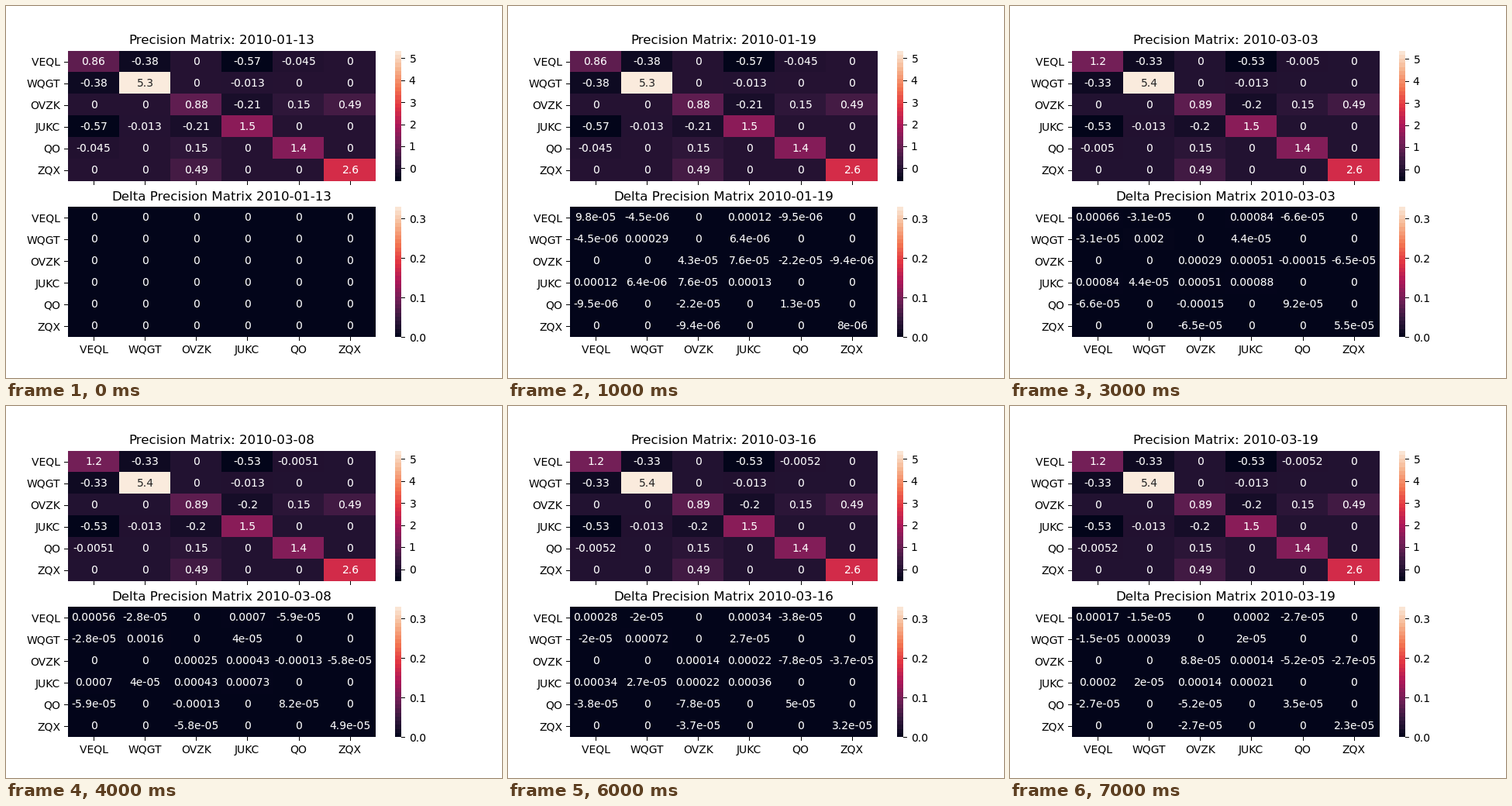
Write an HTML page with a canvas that moves like this. It is 640x480 px and loops after 8000 ms.

```html
<!DOCTYPE html>
<html lang="en">
<head>
<meta charset="utf-8">
<title>Precision matrix</title>
<style>
  html, body { margin: 0; width: 100%; height: 100%; overflow: hidden; background: #fff; }
  canvas { display: block; }
</style>
</head>
<body>
<canvas id="stage" width="640" height="480"></canvas>
<script>
const ctx = document.getElementById('stage').getContext('2d');
const STEP = 1000;
const LABELS = ['VEQL', 'WQGT', 'OVZK', 'JUKC', 'QO', 'ZQX'];
const DATES = ['01-13', '01-19', '02-26', '03-03', '03-08', '03-11', '03-16', '03-19'];
const N = LABELS.length;
const LEFT = 80, WIDTH = 396.8, HEIGHT = 168;
const CELL_W = WIDTH / N, CELL_H = HEIGHT / N;
const BAR = { x: 502, w: 8, bands: 32 };
const SMALL = 13.89, LARGE = 16.67;
const RAMP = ['#03051a', '#35193e', '#701f57', '#ad1759', '#e13342', '#f37651', '#f6b48f', '#faebdd'];

// Non-zero entries of the symmetric matrices; change is the peak delta in 1e-6.
const ENTRIES = [
  { at: '00', value: 0.857, change: 700, drift: 0.34 },
  { at: '01', value: -0.376, change: -32, drift: 0.043 },
  { at: '03', value: -0.57, change: 890, drift: 0.042 },
  { at: '04', value: -0.0451, change: -68, drift: 0.04016 },
  { at: '11', value: 5.347, change: 2100, drift: 0.025 },
  { at: '13', value: -0.013, change: 46 },
  { at: '22', value: 0.884, change: 310, drift: 0.003 },
  { at: '23', value: -0.206, change: 540, drift: 0.003 },
  { at: '24', value: 0.15, change: -160 },
  { at: '25', value: 0.49, change: -67 },
  { at: '33', value: 1.5, change: 930 },
  { at: '44', value: 1.4, change: 96 },
  { at: '55', value: 2.6, change: 57 }
];

// The estimate shifts at the third date, then slowly relaxes.
function precision({ value, drift = 0 }, step) {
  return step < 2 ? value : value + drift * (1 - 0.0015 * (step - 2));
}

// Changes start small, peak at the third date and shrink by a falling power.
function delta({ change }, step) {
  if (step < 2) return step * 0.14 * change * 1e-6;
  const power = 1 - 0.22 * ((step - 2) / 5) ** 2;
  return Math.sign(change) * Math.abs(change) ** power * 1e-6;
}

function matrix(rule, step) {
  const grid = LABELS.map(() => Array(N).fill(0));
  for (const entry of ENTRIES) {
    const [r, c] = entry.at;
    grid[r][c] = grid[c][r] = rule(entry, step);
  }
  return grid;
}

function shade(t) {
  const pos = Math.min(1, Math.max(0, t)) * (RAMP.length - 1);
  const i = Math.min(RAMP.length - 2, Math.floor(pos));
  const channel = (hex, k) => parseInt(hex.slice(k, k + 2), 16);
  const mix = k => {
    const a = channel(RAMP[i], k), b = channel(RAMP[i + 1], k);
    return Math.round(a + (b - a) * (pos - i));
  };
  return `rgb(${[1, 3, 5].map(mix)})`;
}

// Two significant digits, with an exponent below 1e-4.
function format(v) {
  if (v === 0) return '0';
  const rounded = +v.toPrecision(2);
  if (Math.abs(rounded) >= 1e-4) return String(rounded);
  return rounded.toExponential(1).replace('.0e', 'e').replace('e-', 'e-0');
}

function setFont(size) {
  ctx.font = `${size}px "DejaVu Sans", sans-serif`;
}

// Whole-pixel layout: the first glyph snaps down by its bearing, the rest snap up.
function text(str, x, y, align = 0.5, color = '#000', size = SMALL) {
  const first = str[0], rest = str.slice(1), zoom = 100;
  setFont(size * zoom);
  const bearing = -ctx.measureText(first).actualBoundingBoxLeft / zoom;
  const width = ctx.measureText(str).width / zoom;
  const advance = width - ctx.measureText(rest).width / zoom;
  const left = Math.round(x - width * align + bearing);
  setFont(size);
  ctx.fillStyle = color;
  ctx.fillText(first, left - Math.floor(bearing), Math.round(y));
  ctx.fillText(rest, left - Math.ceil(bearing) + advance, Math.round(y));
}

function rect(x, y, w, h, color) {
  ctx.fillStyle = color;
  ctx.fillRect(x, y, w, h);
}

const tickAcross = (x, y) => rect(x, Math.round(y), 5, 1, '#000');
const tickDown = (x, y) => rect(Math.round(x), Math.round(y), 1, 5, '#000');

function clipped(x, y, w, h, paint) {
  const x0 = Math.round(x), y0 = Math.round(y);
  ctx.save();
  ctx.beginPath();
  ctx.rect(x0, y0, Math.round(x + w) - x0, Math.round(y + h) - y0);
  ctx.clip();
  paint();
  ctx.restore();
}

function colorbar(top, low, high, interval, digits) {
  clipped(BAR.x, top, BAR.w, HEIGHT, () => {
    for (let i = 0; i < BAR.bands; i++) {
      const y = Math.round(top + HEIGHT * i / BAR.bands);
      rect(BAR.x, y, BAR.w, HEIGHT, shade(1 - (i + 0.5) / BAR.bands));
    }
  });
  for (let v = 0; v < high; v += interval) {
    const y = top + HEIGHT * (1 - (v - low) / (high - low));
    tickAcross(BAR.x + BAR.w, y);
    text(v.toFixed(digits), 519.72, y + 5.4, 0);
  }
}

function heatmap(top, title, grid, low, high) {
  const level = v => (v - low) / (high - low);
  const midX = c => LEFT + (c + 0.5) * CELL_W;
  const midY = r => top + (r + 0.5) * CELL_H;

  // Each cell runs past its far edges; its neighbours cover the excess.
  clipped(LEFT, top, WIDTH, HEIGHT, () => {
    grid.forEach((row, r) => row.forEach((v, c) => {
      const x = Math.floor(LEFT + c * CELL_W), y = Math.floor(top + r * CELL_H);
      rect(x, y, CELL_W + 2, CELL_H + 2, shade(level(v)));
    }));
  });
  grid.forEach((row, r) => row.forEach((v, c) => {
    text(format(v), midX(c), midY(r) + 4, 0.5, level(v) > 0.6 ? '#262626' : '#fff');
  }));
  LABELS.forEach((name, i) => {
    tickAcross(LEFT - 5, midY(i));
    tickDown(midX(i), top + HEIGHT);
    text(name, 70.28, midY(i) + 5.4, 1);
  });
  text(title, LEFT + WIDTH / 2, top - 8.33, 0.5, '#000', LARGE);
}

function draw(step) {
  const date = '2010-' + DATES[step];
  const upper = 57.6, lower = 259.2, deltaMax = 0.33;
  const grid = matrix(precision, step);
  const low = Math.min(...grid.flat()), high = Math.max(...grid.flat());
  rect(0, 0, 640, 480, '#fff');

  heatmap(upper, 'Precision Matrix: ' + date, grid, low, high);
  colorbar(upper, low, high, 1, 0);

  heatmap(lower, 'Delta Precision Matrix ' + date, matrix(delta, step), 0, deltaMax);
  colorbar(lower, 0, deltaMax, 0.1, 1);
  LABELS.forEach((name, c) => text(name, LEFT + (c + 0.5) * CELL_W, 448));
}

const start = performance.now();
let shown = -1;
function tick() {
  const elapsed = Math.max(0, performance.now() - start);
  const step = Math.floor(elapsed / STEP) % DATES.length;
  if (step !== shown) draw(shown = step);
  requestAnimationFrame(tick);
}
tick();
</script>
</body>
</html>
```
